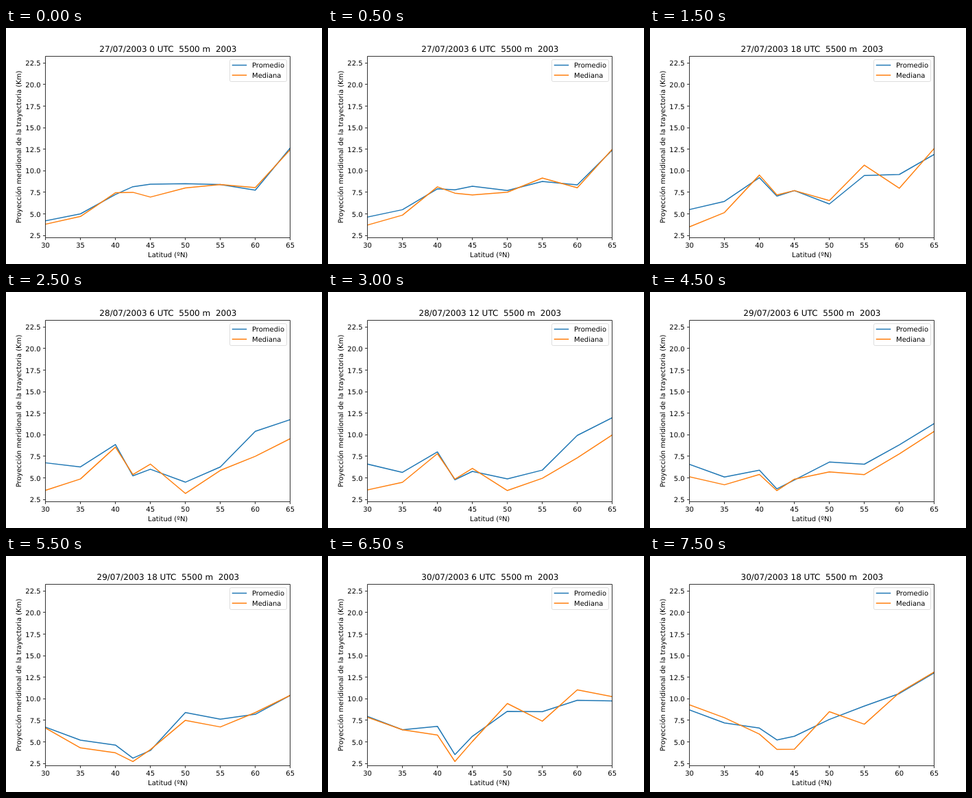
An HTML page that plays this animation: 461 by 346 pixels, repeating every 8000 ms.

```html
<!DOCTYPE html>
<html lang="es">
<head>
<meta charset="utf-8">
<style>
  html, body { margin: 0; width: 100%; height: 100%; overflow: hidden; background: #fff; }
  svg { display: block; }
  text { font: 10px "DejaVu Sans", sans-serif; white-space: pre; text-rendering: geometricPrecision; }
  .mid { text-anchor: middle; }
  .end { text-anchor: end; }
  #title { font-size: 12px; }
  .curve { fill: none; stroke-width: 1.5; stroke-linecap: square; stroke-linejoin: round; }
  .mean { stroke: #1f77b4; }
  .median { stroke: #ff7f0e; }
  .axis { fill: none; stroke: #000; stroke-width: .8; }
</style>
</head>
<body>
<svg width="461" height="346" viewBox="0 0 461 346">
  <clipPath id="plot"><rect x="57.6" y="41.5" width="357.1" height="266.1"/></clipPath>
  <g clip-path="url(#plot)">
    <path id="mean" class="curve mean"/>
    <path id="median" class="curve median"/>
  </g>
  <path id="axes" class="axis"/>
  <g id="labels"></g>
  <text id="title" class="mid" x="236.4" y="35"></text>
  <text class="mid" x="236.2" y="336">Latitud (ºN)</text>
  <text class="mid" transform="translate(22 174.5) rotate(-90)">Proyección meridional de la trayectoria (Km)</text>
  <rect x="326.5" y="46.5" width="83" height="32" rx="2" fill="#fff" fill-opacity=".8" stroke="#ccc" stroke-opacity=".8" stroke-width=".8"/>
  <path class="curve mean" d="M330.5 54.5H350.5"/>
  <path class="curve median" d="M330.5 69.2H350.5"/>
  <text x="359" y="58">Promedio</text>
  <text x="359" y="73">Mediana</text>
</svg>
<script>
const $ = id => document.getElementById(id);
const STEP = 500, STEPS = 16;
const px = lat => 57.6 + (lat - 30) * 10.203;
const py = km => 304.1 - (km - 2.5) * 12.64;

// Key profiles, one value per 5º: the mean, the median's gap to it,
// and a kink that both share at 42.5º. A step lasts 6 h.
const keys = [
  { step: 0, kink: .3, mean: [4.2, 5, 7.25, 8.45, 8.5, 8.4, 7.75, 12.65], gap: [-.4, -.3, .2, -1.5, -.5, 0, .3, -.2] },
  { step: 3, kink: -1.4, mean: [5.5, 6.45, 9.2, 7.7, 6.15, 9.45, 9.57, 11.9], gap: [-2, -1.3, .3, 0, .4, 1.2, -1.6, .7] },
  { step: 5, kink: -2.2, mean: [6.75, 6.27, 8.87, 6, 4.5, 6.27, 10.4, 11.75], gap: [-3.2, -1.4, -.3, .6, -1.3, -.4, -2.9, -2.2] },
  { step: 7, kink: -2, mean: [6.45, 5, 7.15, 5.5, 5.27, 5.53, 9.45, 12.2], gap: [-2.8, -.9, -.1, .1, -1.4, -1.5, -2.3, -1.8] },
  { step: 11, kink: -1.2, mean: [6.7, 5.2, 4.63, 4, 8.4, 7.63, 8.2, 10.4], gap: [-.1, -.9, -.9, .1, -.9, -.9, .2, 0] },
  { step: 13, kink: -2.7, mean: [7.95, 6.4, 6.8, 5.65, 8.55, 8.5, 9.83, 9.75], gap: [-.1, 0, -1, -.6, .9, -1.1, 1.2, .5] },
  { step: 15, kink: -.9, mean: [8.7, 7.2, 6.6, 5.65, 7.6, 9.15, 10.6, 13], gap: [.6, .6, -.7, -1.5, .9, -2.1, .1, .1] }
];

const mix = (a, b, t) => a + (b - a) * t;
const mixRows = (a, b, t) => a.map((v, i) => mix(v, b[i], t));

function profileAt(step) {
  const n = Math.max(1, keys.findIndex(k => k.step >= step));
  const a = keys[n - 1], b = keys[n], t = (step - a.step) / (b.step - a.step);
  const mean = mixRows(a.mean, b.mean, t), gap = mixRows(a.gap, b.gap, t);
  return { mean, median: mean.map((v, i) => v + gap[i]), kink: mix(a.kink, b.kink, t) };
}

function line(row, kink) {
  const points = [];
  row.forEach((v, i) => {
    const lat = 30 + 5 * i;
    points.push([lat, v]);
    if (lat === 40) points.push([42.5, (v + row[i + 1]) / 2 + kink]);
  });
  return 'M' + points.map(([lat, km]) => `${px(lat)} ${py(km)}`).join('L');
}

function drawAxes() {
  let d = 'M57.5 41.5H414.5V307.5H57.5Z', labels = '';
  const snap = v => Math.floor(v) + .5;
  for (let lat = 30; lat <= 65; lat += 5) {
    d += `M${snap(px(lat))} 307.5v3.5`;
    labels += `<text class="mid" x="${px(lat)}" y="322">${lat}</text>`;
  }
  for (let km = 2.5; km <= 22.5; km += 2.5) {
    d += `M57.5 ${snap(py(km))}h-3.5`;
    labels += `<text class="end" x="50.6" y="${Math.round(py(km) + 4.1)}">${km.toFixed(1)}</text>`;
  }
  $('axes').setAttribute('d', d);
  $('labels').innerHTML = labels;
}

let shown = -1;
function draw(now) {
  const step = Math.floor(now / STEP) % STEPS;
  if (step !== shown) {
    shown = step;
    const { mean, median, kink } = profileAt(step);
    $('mean').setAttribute('d', line(mean, kink));
    $('median').setAttribute('d', line(median, kink));
    $('title').textContent = `${27 + (step >> 2)}/07/2003 ${step % 4 * 6} UTC  5500 m  2003`;
  }
  requestAnimationFrame(() => draw(performance.now() - start));
}

drawAxes();
const start = performance.now();
draw(0);
</script>
</body>
</html>
```
